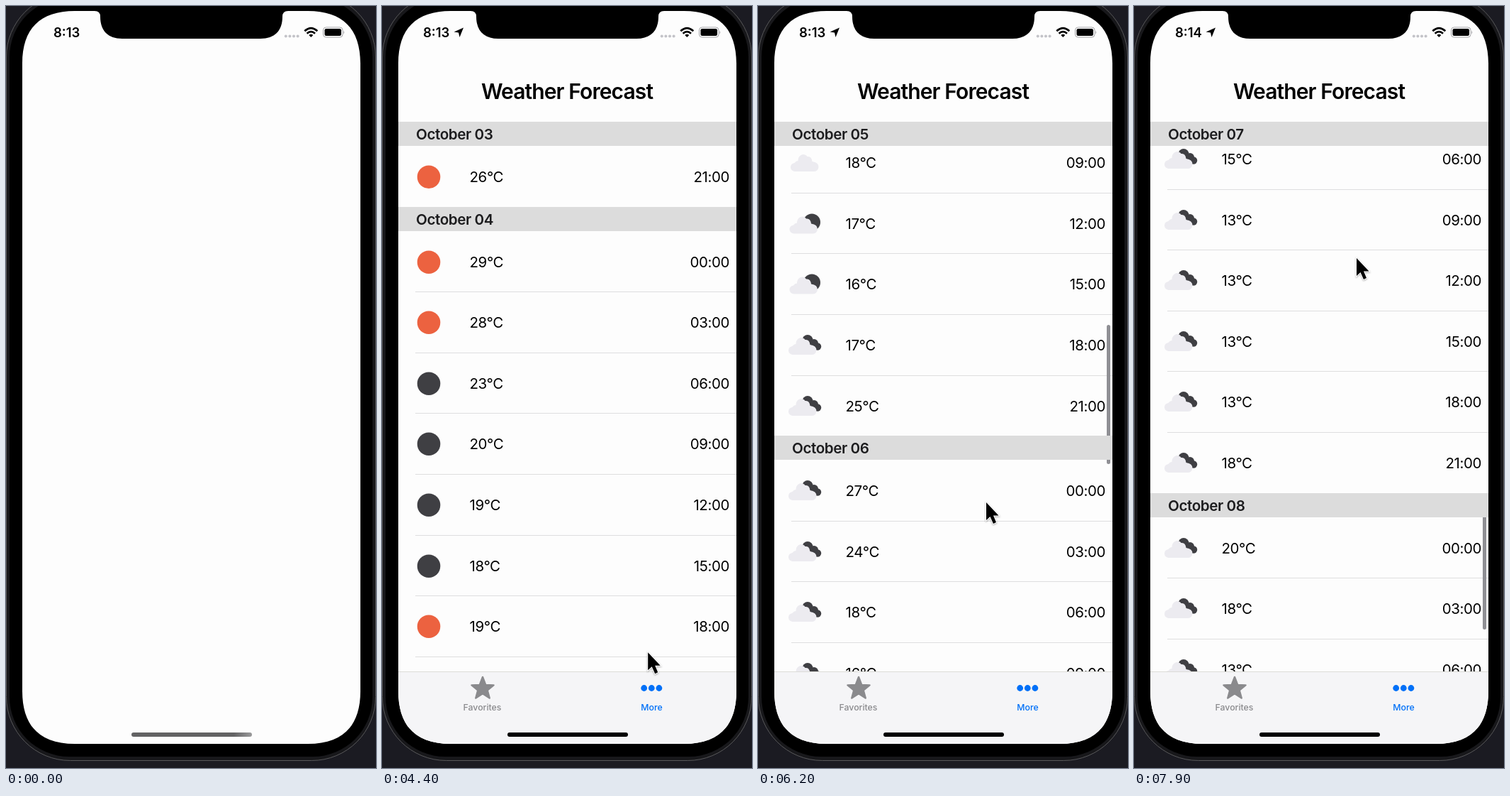
Write an HTML page that moves like this. It is 522 px wide and 1073 px high and loops after 8 s.

```html
<!DOCTYPE html>
<html lang="en">
<head>
<meta charset="utf-8">
<title>Weather app</title>
<style>
html, body { margin: 0; width: 100%; height: 100%; overflow: hidden; background: #1b1b22; }
body { position: relative; font-family: Inter, Roboto, sans-serif; color: #000; }
svg { position: absolute; left: 0; top: 0; }
#screen {
  position: absolute; left: 0; top: 0; width: 522px; height: 1073px; background: #fdfdfd;
  clip-path: path("M97 7H125Q133 7 133 15C133 35 144 46 164 46H359C379 46 390 35 390 15Q390 7 398 7H426C475 7 500 32 500 81V965C500 1014 475 1039 426 1039H97C48 1039 23 1014 23 965V81C23 32 48 7 97 7Z");
}

/* scene switches */
.boot, .late, .load, .today, .more, .early, .minute { animation: 8s step-end infinite; }
.boot { animation-name: boot; }
.late { animation-name: late; }
.load { animation-name: load; }
.today { animation-name: today; }
.more { animation-name: more; }
.early { animation-name: early; }
.minute { animation-name: minute; }
@keyframes boot { 0% { visibility: visible } 10%, 100% { visibility: hidden } }
@keyframes late { 0% { visibility: hidden } 10%, 100% { visibility: visible } }
@keyframes load { 0% { visibility: hidden } 10% { visibility: visible } 22.5%, 100% { visibility: hidden } }
@keyframes today { 0% { visibility: hidden } 22.5% { visibility: visible } 47.5%, 100% { visibility: hidden } }
@keyframes more { 0% { visibility: hidden } 47.5%, 100% { visibility: visible } }
@keyframes early { 0% { visibility: hidden } 10% { visibility: visible } 92.5%, 100% { visibility: hidden } }
@keyframes minute { 0% { visibility: hidden } 92.5%, 100% { visibility: visible } }

.tabA, .tabB { animation: tabA 8s step-end infinite; }
.tabB { animation-name: tabB; }
@keyframes tabA { 0% { color: #0070f8 } 47.5%, 100% { color: #8a8a8d } }
@keyframes tabB { 0% { color: #8a8a8d } 47.5%, 100% { color: #0070f8 } }

/* chasing dots */
.orbit { transform-origin: 261px 523px; animation: orbit 8s infinite; }
.dot { transform-origin: 261px 416px; animation: dot 8s infinite; }
.orbit, .dot { animation-timing-function: var(--ease); }
@keyframes orbit {
  0%, 10.3125% { transform: rotate(0deg) }
  29.0625%, 100% { transform: rotate(360deg) }
}
@keyframes dot {
  0%, 10.3125% { transform: scale(var(--from)) }
  29.0625%, 100% { transform: scale(var(--to)) }
}

.time { font-size: 18.5px; font-weight: 600; }
.tab { font-size: 12.3px; font-weight: 500; text-anchor: middle; fill: currentColor; }
.mid { text-anchor: middle; font-size: 20.5px; letter-spacing: -.02em; }

#list { position: absolute; left: 23px; top: 163px; width: 477px; height: 774px; overflow: hidden; }
.day { position: sticky; top: 0; z-index: 1; box-sizing: border-box; height: 34px; padding-left: 25px;
  background: #dcdcdc; color: #1c1c1e; font-size: 20.6px; font-weight: 600; letter-spacing: -.02em; line-height: 35px; }
.row { position: relative; height: 85.6px; line-height: 87.6px; font-size: 20.5px; letter-spacing: -.02em; }
.row + .row::before { content: ""; position: absolute; left: 24px; right: 0; top: 0; height: 1px; background: #dededf; }
.row b, .row i { position: absolute; top: 0; font-weight: 400; font-style: normal; }
.row b { left: 100.5px; }
.row i { right: 10px; }
#thumb { position: absolute; left: 492px; width: 4.5px; border-radius: 3px; background: #8f8f94; }
</style>
</head>
<body>
<svg width="522" height="1073">
  <rect width="522" height="1073" fill="#1b1b22"/>
  <rect x=".5" y="-18" width="521" height="1080.5" rx="90" fill="#18181b" stroke="#58585a"/>
  <rect x="5" y="-12" width="512" height="1069" rx="84"/>
</svg>

<div id="screen">
  <svg class="load" width="522" height="1073" id="spinner" fill="#fe0000"></svg>

  <svg class="today" width="522" height="1073" fill="none" stroke-linecap="round" stroke-linejoin="round">
    <g fill="#000">
      <text class="mid" x="261" y="112" style="font-size:24.4px;font-weight:500;letter-spacing:-.025em">Cupertino</text>
      <text class="mid" x="261" y="214" style="font-size:60px;letter-spacing:-.03em">23 °C</text>
      <text class="mid" x="261.5" y="525">smoke</text>
      <text class="mid" x="96" y="708" style="font-size:13px;letter-spacing:0">1015 мм рт.ст</text>
      <text class="mid" x="261.5" y="709">0.45 м/с</text>
      <text class="mid" x="427" y="709">20 %</text>
      <text class="mid" x="177" y="858">42 %</text>
      <text class="mid" x="345.5" y="858">23 hz</text>
    </g>
    <path d="M248 366H269M232 374H273M247 382H295M228 390H277M239 398H288M247 406H277" stroke="#45454a" stroke-width="4"/>

    <g stroke="#3a80bd" stroke-width="3.6">
      <g id="gust">
        <path d="M77 607C77 634 61 637 61 668"/>
        <path d="M54 668H68L61 676Z" fill="#3a80bd" stroke-width="2"/>
      </g>
      <use href="#gust" x="20.5"/><use href="#gust" x="41"/>
      <path d="M122 607H136V676H122M128 615.5H136M128 624H136M124 632.5H136M128 641.5H136M124 650H136M128 658.5H136M128 667H136" stroke-width="2.8" stroke-linecap="butt"/>
    </g>

    <path d="M228 602V683M220.5 683H256M265 683H269.5" stroke="#4a4d57" stroke-width="4.2"/>
    <path d="M231 618L248 602L300 613Q303 614 303 617V627Q303 630 300 631L250 642L231 622M248 602Q241 622 250 642M268 607V637M286 611V633" stroke="#61b5f5" stroke-width="3.6"/>

    <g stroke="#7c6192" stroke-width="2.6" fill="#aed4ee">
      <path id="cloud" d="M402 665C381 664 382 637 401 634C403 598 447 595 454 631C475 633 474 664 454 665Z"/>
      <path d="M420 615Q429 609 438 614M443 618L446 622" stroke="#fff" stroke-width="2"/>
      <path d="M440 660H463" stroke-width="4" stroke-dasharray="2 4" stroke-linecap="butt"/>
      <path d="M395 677C381 676 382 659 395 657C397 635 424 634 427 655C441 657 440 676 427 677Z" fill="#bfdff4"/>
      <path d="M396 672H429" stroke-width="4" stroke-dasharray="2 4" stroke-linecap="butt"/>
      <path d="M405 648Q411 644 416 647" stroke="#fff" stroke-width="2"/>
    </g>

    <g stroke="#4584c0" stroke-width="2.4">
      <circle cx="170.5" cy="785" r="33.5" fill="#82bdf0"/>
      <circle cx="170.5" cy="785" r="26" fill="#f0f7fd"/>
      <path d="M157 797A18 18 0 1 1 184 797" stroke="#a9d2f5" stroke-width="5" stroke-linecap="butt"/>
      <path d="M164 773L172 786V794" stroke="#35629b" stroke-width="3.4"/>
      <circle cx="170.5" cy="786" r="3.4" fill="#35629b"/>
      <path d="M205 794C199 805 191 812 191 820A14.3 14.3 0 0 0 219.600 820C219.600 812 211 805 205 794Z" fill="#d2e7f8"/>
      <path d="M212 822Q211 827 206 828" stroke="#86bdea"/>
    </g>

    <g stroke="#7c6192" stroke-width="2.6" fill="#b9b8d0">
      <path d="M320 811C297 811 298 779 319 777C319 740 365 738 373 773C394 776 393 810 372 811Z"/>
      <path d="M336 757Q346 751 356 757M361 761L364 766" stroke="#e2e0ee" stroke-width="2.200"/>
      <path d="M312 806H380" stroke-width="5" stroke-dasharray="2.400 4" stroke-linecap="butt"/>
      <g fill="#a8d5f4" stroke-width="2">
        <path id="flake" d="M327 815L333 823L327 831L321 823Z"/>
        <use href="#flake" x="20" y="3"/><use href="#flake" x="40"/>
      </g>
    </g>
  </svg>

  <div class="more">
    <svg width="522" height="163"><text class="mid" x="261" y="130.5" style="font-size:30px;font-weight:600;letter-spacing:-.03em">Weather Forecast</text></svg>
    <div id="list"></div>
    <div id="thumb"></div>
  </div>

  <svg class="late" width="522" height="1073">
    <rect y="937" width="522" height="136" fill="#f5f5f7"/>
    <rect y="937" width="522" height="1" fill="#dcdcd8"/>
    <g class="tabA">
      <path d="M142 945L146.2 956L157.5 956.4L148.7 963.6L151.7 974.5L142 968.3L132.3 974.5L135.3 963.6L126.500 956.4L137.8 956Z" fill="currentColor" stroke="currentColor" stroke-width="2.500" stroke-linejoin="round"/>
      <text class="tab" x="141.5" y="992">Favorites</text>
    </g>
    <g class="tabB">
      <g fill="currentColor"><circle cx="369.700" cy="960.5" r="4.400"/><circle cx="380.300" cy="960.5" r="4.400"/><circle cx="390.900" cy="960.5" r="4.400"/></g>
      <text class="tab" x="380.5" y="992">More</text>
    </g>
    <rect x="177" y="1023" width="170" height="6" rx="3"/>
  </svg>

  <svg width="522" height="1073">
    <defs><linearGradient id="fade"><stop offset=".85" stop-color="#636364"/><stop offset="1" stop-color="#9a9a9b"/></linearGradient></defs>
    <g class="boot">
      <text class="time" x="67" y="44">8:13</text>
      <rect x="177" y="1023" width="170" height="6" rx="3" fill="url(#fade)"/>
    </g>
    <text class="time early" x="58" y="44">8:13</text>
    <text class="time minute" x="58" y="44">8:14</text>
    <path class="late" d="M115 30.500L109.500 44L108 37.500L101.500 36.500Z"/>
    <g fill="#c3c3c8"><circle cx="394.800" cy="42.500" r="2"/><circle cx="400.400" cy="42.500" r="2"/><circle cx="406" cy="42.500" r="2"/><circle cx="411.600" cy="42.500" r="2"/></g>
    <g fill="none" stroke="#000" stroke-width="2.700">
      <path d="M421.300 35.300Q430.300 27 439.300 35.300M424.600 38.700Q430.300 33.600 436 38.700"/>
      <path d="M430.300 44L427.300 41Q430.300 38.700 433.300 41Z" fill="#000" stroke="none"/>
    </g>
    <rect x="447.500" y="30" width="27.500" height="14" rx="4" fill="none" stroke="#a2a2a5"/>
    <rect x="449.500" y="32" width="23.500" height="10" rx="2.300"/>
    <path d="M476.300 35Q478.300 37 476.300 39.500Z" fill="#a2a2a5"/>
  </svg>
</div>

<svg id="pointer" width="24" height="36" viewBox="-3 -3 24 36" style="filter:drop-shadow(0 1px 1px #0005)">
  <path d="M0 0V25L5.500 20L10 30L14 28L10 18.500H17.500Z" fill="#000" stroke="#fff" stroke-width="2" paint-order="stroke"/>
</svg>

<script>
const $ = id => document.getElementById(id);
const LOOP = 8000;

// five dots, each with its own easing and size change
for (let i = 0; i < 5; i++) {
  const rate = i / 5;
  const style = `--ease:cubic-bezier(.5,${0.15 + rate},.25,1);--from:${1 - rate};--to:${0.2 + rate}`;
  $('spinner').innerHTML += `<g class="orbit" style="${style}"><circle class="dot" cx="261" cy="416" r="26.75"/></g>`;
}

// forecast list
const DARK = '#3f3f43', PALE = '#ecebf0';
const disc = (x, y, r, fill) => `<circle cx="${x}" cy="${y}" r="${r}" fill="${fill}"/>`;
const puff = (x, y) => `<path transform="translate(${x} ${y})" fill="${PALE}"
  d="M6 25A6 6 0 0 1 5 13Q7 10 10 10C10 2 18 -2 23 4Q29 3 30 11Q39 12 39 19Q38 25 32 25Z"/>`;
const icons = {
  s: disc(43, 43.8, 16.3, '#ec6240'),
  m: disc(43, 43.8, 16.3, DARK),
  c: puff(23.5, 31),
  h: disc(53, 41.5, 12, DARK) + puff(22, 32.500),
  b: disc(47, 36.5, 7.5, DARK) + disc(56, 41, 6, DARK) + disc(61, 45.5, 5.2, DARK) + puff(20.5, 32)
};
const days = [
  [21, 's', 26],
  [0, 'sssmmmss'.replace('sssm', 'ssmm'), 29, 28, 23, 20, 19, 18, 19, 28],
  [0, 'cbcchhbb', 31, 29, 20, 18, 17, 16, 17, 25],
  [0, 'bbbbbbbb', 27, 24, 18, 16, 15, 15, 15, 22],
  [0, 'bbbbbbbb', 24, 21, 15, 13, 13, 13, 13, 18],
  [0, 'bbbbbbb', 20, 18, 13, 13, 12, 12, 13]
];
const two = n => String(n).padStart(2, '0');
$('list').innerHTML = days.map(([hour, sky, ...temps], d) =>
  `<section><div class="day">October ${two(d + 3)}</div>` + temps.map((deg, i) =>
    `<div class="row"><svg width="100" height="86">${icons[sky[i]]}</svg><b>${deg}°C</b><i>${two(hour + i * 3)}:00</i></div>`
  ).join('') + '</section>').join('');

// smooth monotone curve through [position, value] points
const slope = (k, i) => (k[i + 1][1] - k[i][1]) / (k[i + 1][0] - k[i][0]);
function tangent(k, i) {
  if (i < 1 || i > k.length - 2) return 0;
  const a = slope(k, i - 1), b = slope(k, i);
  return a * b > 0 ? 2 * a * b / (a + b) : 0;
}
function along(k, x) {
  const last = k.length - 1;
  if (x <= k[0][0]) return k[0][1];
  if (x >= k[last][0]) return k[last][1];
  let i = 0;
  while (x > k[i + 1][0]) i++;
  const w = k[i + 1][0] - k[i][0], u = (x - k[i][0]) / w, v = 1 - u;
  return v * v * (1 + 2 * u) * k[i][1] + u * u * (3 - 2 * u) * k[i + 1][1]
    + w * u * v * (v * tangent(k, i) - u * tangent(k, i + 1));
}

const scroll = [[4900, 0], [5100, 130], [5300, 356], [5600, 760], [5900, 1000], [6200, 1115], [6500, 1400],
  [6800, 1630], [7100, 1780], [7300, 1840], [7600, 2150], [7900, 2472], [8000, 2540]];
const thumbTop = [[0, 167], [356, 265], [1115, 449], [1630, 559], [2472, 708], [2700, 748]];
const thumbLen = [[0, 224], [356, 214], [1115, 196], [1630, 187], [2472, 170], [2700, 166]];
const handX = [[2200, 300], [3400, 341], [3700, 378], [4000, 378], [5300, 357], [6200, 322], [6800, 322], [7900, 314]];
const handY = [[2200, 1090], [2800, 960], [3400, 920], [3700, 960], [3900, 960], [4900, 790], [5300, 463], [5500, 440],
  [6050, 724], [6200, 699], [6500, 450], [6800, 459], [7200, 690], [7300, 690], [7700, 330], [7900, 355], [8000, 380]];

let start;
function draw(now) {
  start ??= now;
  const t = (now - start) % LOOP;
  const y = along(scroll, t);
  $('list').scrollTop = y;
  const bar = $('thumb').style;
  bar.top = along(thumbTop, y) + 'px';
  bar.height = along(thumbLen, y) + 'px';
  bar.opacity = Math.min(1, Math.max(0, (t - 4900) / 150));
  const hand = $('pointer').style;
  hand.visibility = t < 2200 ? 'hidden' : 'visible';
  hand.transform = `translate(${along(handX, t) - 3}px, ${along(handY, t) - 3}px)`;
  requestAnimationFrame(draw);
}
requestAnimationFrame(draw);
</script>
</body>
</html>
```
